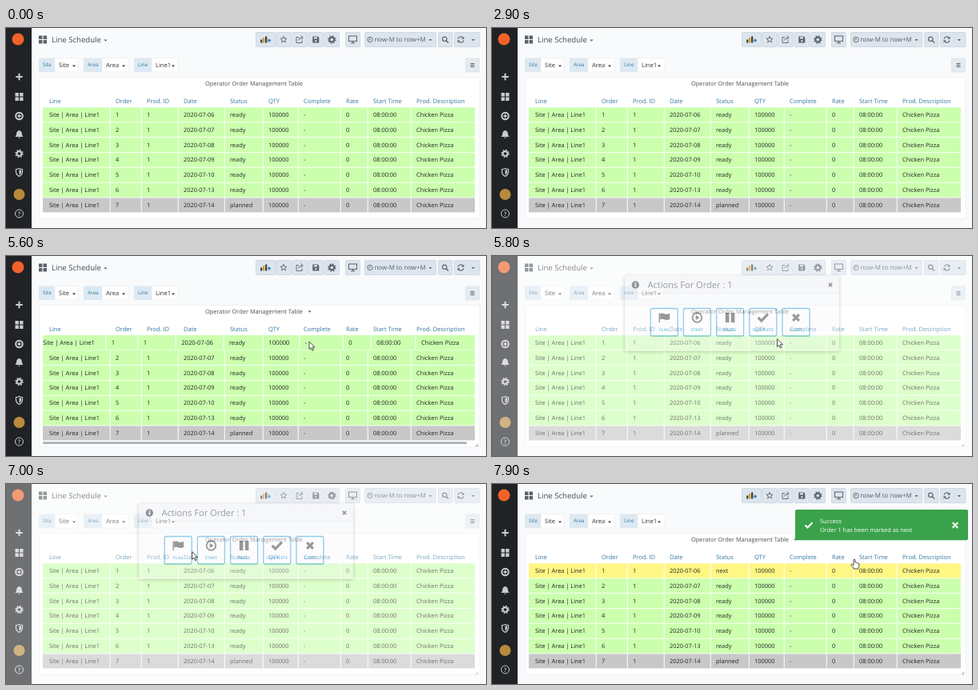
An HTML page that plays this animation: 600 px wide and 250 px high, repeating every 8000 ms.

```html
<!DOCTYPE html>
<html lang="en">
<head>
<meta charset="utf-8">
<title>Line Schedule</title>
<style>
html, body { margin: 0; width: 100%; height: 100%; overflow: hidden; background: #f9fafb; }
svg { display: block; width: 600px; height: 250px; }
text { font-family: "Open Sans", "Noto Sans", sans-serif; text-rendering: geometricPrecision; white-space: pre; }
</style>
</head>
<body>
<svg id="stage" viewBox="0 0 600 250">
  <defs>
    <clipPath id="tableClip"><rect x="46" y="98" width="540" height="134"/></clipPath>
    <filter id="shadow" x="-10%" y="-20%" width="120%" height="150%">
      <feDropShadow dx="0" dy="1" stdDeviation="2" flood-color="#000" flood-opacity=".4"/>
    </filter>
    <g id="gear">
      <circle r="2.9" fill="none" stroke="currentColor" stroke-width="2.1"/>
      <circle r="4.4" fill="none" stroke="currentColor" stroke-width="1.6" stroke-dasharray="1.7 1.756"/>
    </g>
    <path id="caret" d="M-2 -1.1H2L0 1.3Z"/>
    <path id="grid" d="M-5 -5H-.6V-.6H-5ZM.6 -5H5V-.6H.6ZM-5 .6H-.6V5H-5ZM.6 .6H5V5H.6Z"/>
    <path id="cross" d="M-3 -3L3 3M3 -3L-3 3" fill="none"/>
    <path id="check" d="M-4.5 0L-1.5 3L4.5 -3.2" fill="none"/>
  </defs>
  <g id="page"></g>
  <g id="tools"></g>
  <g id="filters"></g>
  <g id="table"></g>
  <g id="side"></g>
  <g id="toast"></g>
  <g id="modal"></g>
  <g id="cursor" stroke="#222" stroke-width=".8" stroke-linejoin="round" fill="#fff">
    <path id="arrow" d="M0 0V9.6L2.2 7.6L3.8 11.2L5.5 10.4L3.9 7H7Z"/>
    <path id="hand" d="M-1 .8Q0 -.8 1 .8V4.2Q2 3.4 2.8 4.5Q3.8 3.9 4.4 5Q5.6 4.6 5.9 6V8.2Q5.6 10 4.8 10.6V12H-1V10.8L-4 7.4Q-4 5.8 -2.6 6.3L-1 7.5Z"/>
  </g>
</svg>
<script>
const $ = id => document.getElementById(id);
const text = (x, y, s, size = 7.4, fill = '#333', more = '') =>
  `<text x="${x}" y="${y}" font-size="${size}" fill="${fill}" ${more}>${s}</text>`;
const box = (x, y, w, h, fill, more = '') =>
  `<rect x="${x}" y="${y}" width="${w}" height="${h}" fill="${fill}" ${more}/>`;
const use = (id, x, y, more = '', scale = 1) =>
  `<use href="#${id}" transform="translate(${x} ${y}) scale(${scale})" ${more}/>`;
const at = (x, y, body) => `<g transform="translate(${x} ${y})">${body}</g>`;
const line = (d, color, w = 1.2) => `<path d="${d}" fill="none" stroke="${color}" stroke-width="${w}"/>`;
const show = (id, on) => $(id).setAttribute('visibility', on ? 'visible' : 'hidden');

const INK = '#5a626b', BLUE = '#33769f', ACCENT = '#2498d6', FACE = '#dce5ed';

// Page and heading
$('page').innerHTML =
  box(32, 0, 568, 250, '#f9fafb') +
  use('grid', 46, 14.5, `fill="${INK}"`) +
  text(57, 18, 'Line Schedule', 9.6, '#464c54') +
  use('caret', 124.5, 15.5, `fill="${INK}"`);

// Toolbar
const button = (x, w) => box(x, 5.5, w, 18, FACE, 'stroke="#c6d0d9" stroke-width=".7" rx="1"');
const star = Array.from({ length: 10 }, (_, i) => {
  const r = i % 2 ? 1.8 : 4.2, a = i * Math.PI / 5 - Math.PI / 2;
  return (r * Math.cos(a)).toFixed(1) + ',' + (r * Math.sin(a)).toFixed(1);
}).join(' ');
$('tools').innerHTML =
  [[312.5, 24.5], [338, 18.5], [358, 18.5], [378, 18.5], [398, 18.5], [424.5, 18], [448.5, 89], [540.5, 17.5], [560.5, 31.5]]
    .map(b => button(...b)).join('') +
  at(324, 14.5,
    box(-6, 0, 2.3, 4, '#444') + box(-3, -2.5, 2.3, 6.5, '#d99a2b') +
    box(0, -4, 2.3, 8, '#444') + line('M3 1H7M5 -1V3', '#2d7dbb', 1.4)) +
  at(347, 14.5, `<polygon points="${star}" fill="none" stroke="${INK}" stroke-width=".9"/>`) +
  at(367, 14.5, line('M-1 -3H-4V4H3V1M-1.5 1Q-1 -2.5 3 -2.5M1.5 -5L4.3 -2.5L1.5 0', INK, .9)) +
  at(387.3, 14.5, `<path d="M-4 -4H2.5L4 -2.5V4H-4Z" fill="${INK}"/>` +
    box(-2.3, -3.2, 4, 2.2, FACE) + `<circle cy="1.6" r="1.2" fill="${FACE}"/>`) +
  use('gear', 407.3, 14.5, `color="${INK}"`) +
  at(433.5, 14, box(-5, -4, 10, 6.5, 'none', `stroke="${INK}"`) + line('M0 2.5V4.5M-2.5 4.7H2.5', INK, 1.1)) +
  at(455, 14.5, `<circle r="3.2" fill="none" stroke="${INK}" stroke-width=".9"/>` + line('M0 -2V.4H-1.6', INK, .8)) +
  text(460.5, 17.3, 'now-M to now+M', 7.9, '#555c65') +
  use('caret', 530.5, 15, `fill="${INK}"`) +
  at(549, 14.5, `<circle cx="-.7" cy="-.7" r="2.7" fill="none" stroke="${INK}" stroke-width="1.2"/>` + line('M1.2 1.2L4 4', INK, 1.4)) +
  at(568.5, 14.5, line('M-3.5 -.8A3.5 3.5 0 0 1 2.9 -2M3.5 .8A3.5 3.5 0 0 1 -2.9 2', INK, 1.1) +
    `<path d="M4 -4V-.7H.8ZM-4 4V.7H-.8Z" fill="${INK}"/>`) +
  use('caret', 584, 15, `fill="${INK}"`) +
  box(574.5, 38, 17, 17, '#e3ebf1', 'stroke="#d9e1e8" stroke-width=".7"') +
  at(583, 46.5, line('M-2.5 -2H2.5M-2.5 0H2.5M-2.5 2H2.5', INK, 1));

// Filters: start, split, end, label, value, caret x
$('filters').innerHTML = [
  [41, 61, 90, 'Site', 'Site', 85], [97, 120, 153, 'Area', 'Area', 147], [160, 182, 215, 'Line', 'Line1', 209]
].map(([a, b, c, label, value, caret]) =>
  box(a, 37.5, b - a, 17.5, '#dde9f2') +
  box(b, 37.5, c - b, 17.5, '#fff', 'stroke="#e6ebef" stroke-width=".6"') +
  text(a + 5, 48.3, label, 6.3, BLUE) + text(b + 5, 49.3, value, 7.6) +
  use('caret', caret, 47.5, 'fill="#333"')).join('');

// Table
const COLS = [54, 137, 176, 222, 280, 328, 372, 425, 459, 513];
const HEADS = ['Line', 'Order', 'Prod. ID', 'Date', 'Status', 'QTY', 'Complete', 'Rate', 'Start Time', 'Prod. Description'];
const DAYS = ['06', '07', '08', '09', '10', '13', '14'];
const TOP = 99.3, PITCH = 18.85;
const row = (day, i) => {
  const y = TOP + i * PITCH, last = i === 6;
  const cells = ['Site | Area | Line1', i + 1, 1, '2020-07-' + day, last ? 'planned' : 'ready',
    100000, '-', 0, '08:00:00', 'Chicken Pizza'];
  return `<g id="row${i}">` +
    box(46, y, 540, 18, last ? '#c8c8c8' : '#cbffae', `id="fill${i}"`) +
    COLS.slice(1).map(x => box(x - 7.3, y, 1.1, 18, '#fff', 'opacity=".9"')).join('') +
    cells.map((s, c) => text(COLS[c], y + 11.5, s, 7.4, '#1f231f', c === 4 ? `id="status${i}"` : '')).join('') + '</g>';
};
$('table').innerHTML =
  box(41.5, 61.5, 550.5, 177, '#fff', 'stroke="#eceff2" stroke-width=".8"') +
  text(249, 71.7, 'Operator Order Management Table', 7.43, '#4b4f55') +
  HEADS.map((s, c) => text(COLS[c], 93.6, s, 7.5, BLUE, 'font-weight="500"')).join('') +
  `<g clip-path="url(#tableClip)">${DAYS.map(row).join('')}</g>` +
  use('caret', 379.5, 69.5, 'id="menuCaret" fill="#52565c"') +
  `<g id="resizer">${line('M589.5 235V237.5H587', '#8d949b', .8)}</g>` +
  box(46, 232.3, 530, 2.6, '#a9b2b8', 'id="scrollbar" rx="1"');

// Sidebar
const PALE = '#c9cbcf';
$('side').innerHTML =
  box(0, 0, 32, 250, '#202226') +
  '<circle cx="15" cy="14" r="7.5" fill="#f0622a"/>' +
  at(16.5, 61, line('M-4.3 0H4.3M0 -4.3V4.3', PALE, 2)) +
  use('grid', 16.5, 86, `fill="${PALE}"`) +
  at(16.5, 110, `<circle r="4.3" fill="none" stroke="${PALE}" stroke-width="2"/><path d="M0 -3L1 -1L3 0L1 1L0 3L-1 1L-3 0L-1 -1Z" fill="${PALE}"/>`) +
  at(16.5, 133, `<path d="M-5 3Q-3.3 1 -3.3 -1.5Q-3 -4.5 0 -5Q3 -4.5 3.3 -1.5Q3.3 1 5 3ZM-1.5 3.8H1.5Q0 6 -1.5 3.8Z" fill="${PALE}"/>`) +
  use('gear', 16.5, 157, `color="${PALE}"`) +
  at(16.5, 180.5, `<path d="M-4 -4Q-1.5 -4 0 -5Q1.5 -4 4 -4V0Q3.5 3.3 0 5Q-3.5 3.3 -4 0Z" fill="none" stroke="${PALE}" stroke-width="1.2"/><path d="M0 -3.3V3.3Q2.4 2 2.6 0V-2.8Z" fill="${PALE}"/>`) +
  '<circle cx="16.5" cy="208" r="7" fill="#b98a3c"/>' +
  at(16.5, 232, `<circle r="5" fill="none" stroke="${PALE}" stroke-width="1"/>`) +
  text(16.5, 234.8, '?', 7.5, PALE, 'text-anchor="middle" font-weight="600"');

// Notice
$('toast').innerHTML =
  box(379, 32, 216, 38.3, '#3aa24b', 'rx="2"') +
  use('check', 396, 51.5, 'stroke="#fff" stroke-width="2.2"') +
  text(410, 48.8, 'Success', 7.45, '#fff') +
  text(410, 60.3, 'Order 1 has been marked as next', 7.45, '#fff') +
  use('cross', 579, 51.5, 'stroke="#d8f0db" stroke-width="2.2"', 1.1);

// Dialog
const DARK = '#303236', BTN = { x: 198.2, y: 65.5, w: 34, h: 34.5, step: 41.2 };
const ICONS = [
  ['FLAG', line('M-6 -5.5V6', DARK, 1.4) + `<path d="M-5 -5Q-2 -6.3 .5 -4.8Q3 -3.6 7 -5.2V2Q3 3.6 .5 2.4Q-2 1 -5 2.3Z" fill="${DARK}"/>`],
  ['START', `<circle r="5.8" fill="none" stroke="${DARK}" stroke-width="1.8"/><path d="M-1.8 -3L3.2 0L-1.8 3Z" fill="${DARK}"/>`],
  ['PAUSE', box(-5.8, -6, 4.6, 12, DARK) + box(1.2, -6, 4.6, 12, DARK)],
  ['COMPLETE', use('check', 0, 0, `stroke="${DARK}" stroke-width="2.4"`, 1.35)],
  ['CLOSE', use('cross', 0, 0, `stroke="${DARK}" stroke-width="2.3"`, 1.3)]
];
$('modal').innerHTML =
  box(0, 0, 600, 250, '#fff', 'opacity=".7"') +
  box(166, 25, 268, 93.5, '#fafafc', 'filter="url(#shadow)"') +
  box(166, 25, 268, 21, '#f4f6f8') + box(166, 46, 268, .8, '#dce1e5') +
  `<circle cx="179.3" cy="36" r="4.7" fill="${DARK}"/>` +
  box(178.5, 33, 1.7, 1.4, '#fff') + box(178.5, 35.2, 1.7, 3.6, '#fff') +
  text(194.5, 39.7, 'Actions For Order : 1', 11.1, '#3b3f44') +
  use('cross', 423, 36, `stroke="${DARK}" stroke-width="2.2"`, .7) +
  ICONS.map(([label, icon], i) => {
    const x = BTN.x + i * BTN.step, mid = x + BTN.w / 2;
    return box(x, BTN.y, BTN.w, BTN.h, '#fafafc', `rx="2" stroke="${ACCENT}" stroke-width="1.3"`) +
      at(mid, 77, icon) +
      text(mid, 93.7, label, 5.1, ACCENT, 'text-anchor="middle" font-weight="700"');
  }).join('');

// Pointer stops: time, x, y; it travels at a steady pace between them
const PATH = [[5100, 391, 213], [5600, 379, 107], [5700, 379, 107], [6400, 221, 84],
  [6950, 221, 84], [7200, 279, 87], [7900, 453, 94]];
const ramp = (t, from, to) => Math.min(1, Math.max(0, (t - from) / (to - from)));
const pointer = t => {
  const i = Math.max(1, PATH.findIndex(p => p[0] >= t));
  const [t0, x0, y0] = PATH[i - 1], [t1, x1, y1] = PATH[i], k = ramp(t, t0, t1);
  return [x0 + (x1 - x0) * k, y0 + (y1 - y0) * k];
};
const overButton = (x, y) => {
  const dx = x - BTN.x;
  return y > BTN.y && y < BTN.y + BTN.h && dx > 0 && dx < 5 * BTN.step && dx % BTN.step < BTN.w;
};

function draw(t) {
  const [x, y] = pointer(t);
  const fade = ramp(t, 5700, 5900) * (1 - ramp(t, 6900, 7100));
  const done = t >= 7100;
  const inPanel = t > 5100 && t < 5800 || t > 7200;
  const hover = inPanel ? Math.floor((y - TOP) / PITCH) : -1;

  DAYS.forEach((_, i) => {
    const cy = TOP + i * PITCH + 9;
    $('row' + i).setAttribute('transform',
      i === hover ? `translate(316 ${cy}) scale(1.03) translate(-316 ${-cy})` : '');
  });
  show('scrollbar', hover >= 0);
  show('menuCaret', inPanel);
  show('resizer', t > 5100);
  $('fill0').setAttribute('fill', done ? '#fff783' : '#cbffae');
  $('status0').textContent = done ? 'next' : 'ready';

  $('modal').setAttribute('opacity', fade);
  show('toast', done);

  const hand = fade > 0 ? overButton(x, y) : inPanel && y < TOP;
  show('arrow', t >= 5100 && !hand);
  show('hand', t >= 5100 && hand);
  $('cursor').setAttribute('transform', `translate(${x} ${y})`);
}

const start = performance.now();
function tick() {
  const t = (performance.now() - start) % 8000;
  draw(Math.floor(t / 100) * 100);
  requestAnimationFrame(tick);
}
tick();
</script>
</body>
</html>
```
